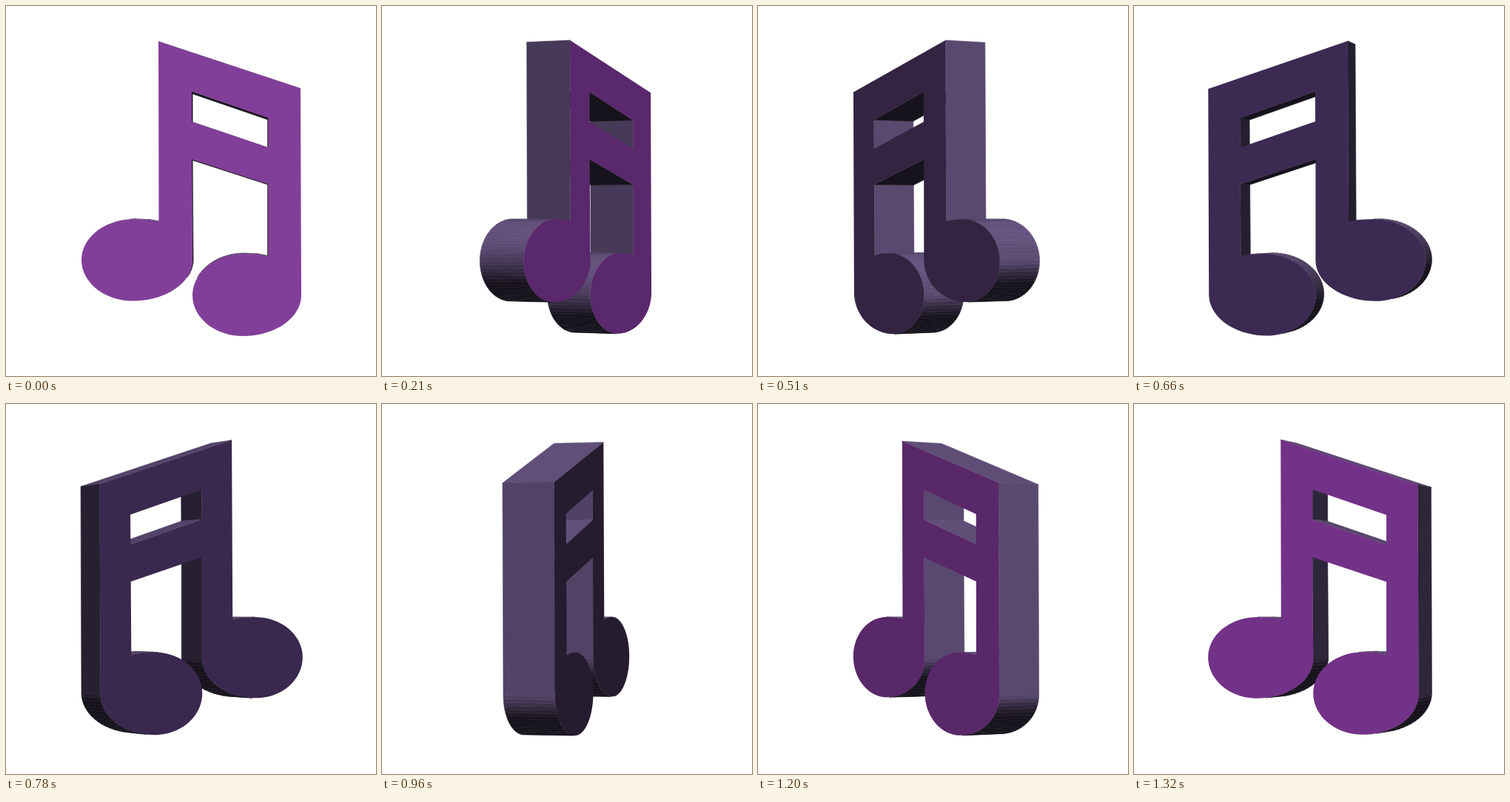
Recreate the animation shown at these times as an HTML page with a canvas. Size 500 px wide and 500 px high, loop 1350 ms.

```html
<!DOCTYPE html>
<html lang="en">
<head>
<meta charset="utf-8">
<title>Turning music note</title>
<style>
html, body { margin: 0; width: 100%; height: 100%; overflow: hidden; background: #fff; }
canvas { display: block; width: 100vw; height: 100vh; }
</style>
</head>
<body>
<canvas id="stage" width="500" height="500"></canvas>
<script>
const ctx = document.getElementById('stage').getContext('2d');
const STEP_MS = 30, LOOP_MS = 1350, STEP_ANGLE = 2 * Math.PI / 46;
const AXIS_X = 251.5, EYE_X = 308, EYE_Y = 280, DISTANCE = 3600;
const HALF_DEPTH = 36, LEAN = 0.0035;
const FRONT_SCALE = DISTANCE / (DISTANCE - HALF_DEPTH);

// Stage point on the unrotated front face -> model point
function toModel([x, y]) {
  const dy = y - EYE_Y;
  return {
    x: (x - LEAN * dy - EYE_X) / FRONT_SCALE + EYE_X - AXIS_X,
    y: dy / FRONT_SCALE
  };
}

// Elliptic quarter between an upright and a level tangent
function quarter([x0, y0], [x1, y1], startsUpright, steps = 18) {
  return Array.from({ length: steps }, (_, i) => {
    const a = (i + 1) / steps * Math.PI / 2;
    const sin = Math.sin(a), rise = 1 - Math.cos(a);
    return startsUpright
      ? [x0 + (x1 - x0) * rise, y0 + (y1 - y0) * sin]
      : [x0 + (x1 - x0) * sin, y0 + (y1 - y0) * rise];
  });
}

// Note head: right side, under, round the left, over to the stem
function head(right, bottom, left, top, stem) {
  const mid = [(top[0] + stem[0]) / 2 + 2, top[1] + 0.7];
  return [
    right,
    ...quarter(right, bottom, true),
    ...quarter(bottom, left, false),
    ...quarter(left, top, true),
    mid, stem
  ];
}

const outline = [
  [206, 47.5], [398, 111],
  ...head([399, 391], [320, 446], [252, 391], [322, 335], [354.5, 338.5]),
  [354.5, 240.5], [251, 207],
  ...head([252, 344], [171, 398.5], [102, 343], [173, 288], [206.5, 291])
].map(toModel);
const hole = [[251, 115.5], [251, 156], [354.5, 191], [354.5, 151]].map(toModel);
const loops = [outline, hole];

const rgb = (r, g, b) => `rgb(${Math.round(r)},${Math.round(g)},${Math.round(b)})`;

function capColor(angle) {
  const c = Math.cos(angle), s = Math.sin(angle);
  if (c > 0) {
    const shine = 13 * c ** 60;
    return rgb(41 + 76.4 * c + 6 * s + shine,
               22 + 28.3 * c + 1.8 * s + shine,
               49.5 + 90 * c + 8 * s + shine);
  }
  return rgb(28 - 33 * c + 1.5 * s, 22 - 20 * c + 0.6 * s, 31 - 51 * c);
}

function sideColor(nx, ny, nz) {
  const shine = 15 * Math.max(0, 0.68 * nx + 0.73 * nz) ** 40;
  const light = Math.max(22, 18.6 + 70 * nz - 62 * ny + 9 * nx) + shine;
  return rgb(light, 0.8 * light + 1, 1.23 * light + 1);
}

function trace(points) {
  points.forEach((p, i) => i ? ctx.lineTo(p.x, p.y) : ctx.moveTo(p.x, p.y));
  ctx.closePath();
}

function draw(angle) {
  const c = Math.cos(angle), s = Math.sin(angle);
  const project = (p, depth) => {
    const z = depth * c - p.x * s;
    const scale = DISTANCE / (DISTANCE - z);
    const dy = p.y * scale;
    return {
      x: EYE_X + (AXIS_X + p.x * c + depth * s - EYE_X) * scale + LEAN * dy,
      y: EYE_Y + dy,
      z
    };
  };

  const walls = [];
  for (const loop of loops) {
    loop.forEach((p, i) => {
      const q = loop[(i + 1) % loop.length];
      const quad = [project(p, HALF_DEPTH), project(q, HALF_DEPTH),
                    project(q, -HALF_DEPTH), project(p, -HALF_DEPTH)];
      const [a, b, d, e] = quad;
      const facing = (d.x - a.x) * (e.y - b.y) - (d.y - a.y) * (e.x - b.x);
      if (facing >= 0) return;
      const length = Math.hypot(q.x - p.x, q.y - p.y);
      const nx = (q.y - p.y) / length, ny = (p.x - q.x) / length;
      walls.push({
        quad,
        z: a.z + b.z + d.z + e.z,
        color: sideColor(nx * c, ny, -nx * s)
      });
    });
  }
  walls.sort((a, b) => a.z - b.z);

  ctx.fillStyle = '#fff';
  ctx.fillRect(0, 0, 500, 500);
  ctx.lineWidth = 0.6;
  ctx.lineJoin = 'round';
  for (const { quad, color } of walls) {
    ctx.fillStyle = ctx.strokeStyle = color;
    ctx.beginPath();
    trace(quad);
    ctx.fill();
    ctx.stroke();
  }

  const capDepth = c > 0 ? HALF_DEPTH : -HALF_DEPTH;
  ctx.fillStyle = capColor(angle);
  ctx.beginPath();
  for (const loop of loops) trace(loop.map(p => project(p, capDepth)));
  ctx.fill('evenodd');
}

const start = performance.now();
function tick() {
  const elapsed = (performance.now() - start) % LOOP_MS;
  draw(Math.floor(elapsed / STEP_MS) * STEP_ANGLE);
  requestAnimationFrame(tick);
}
tick();
</script>
</body>
</html>
```
